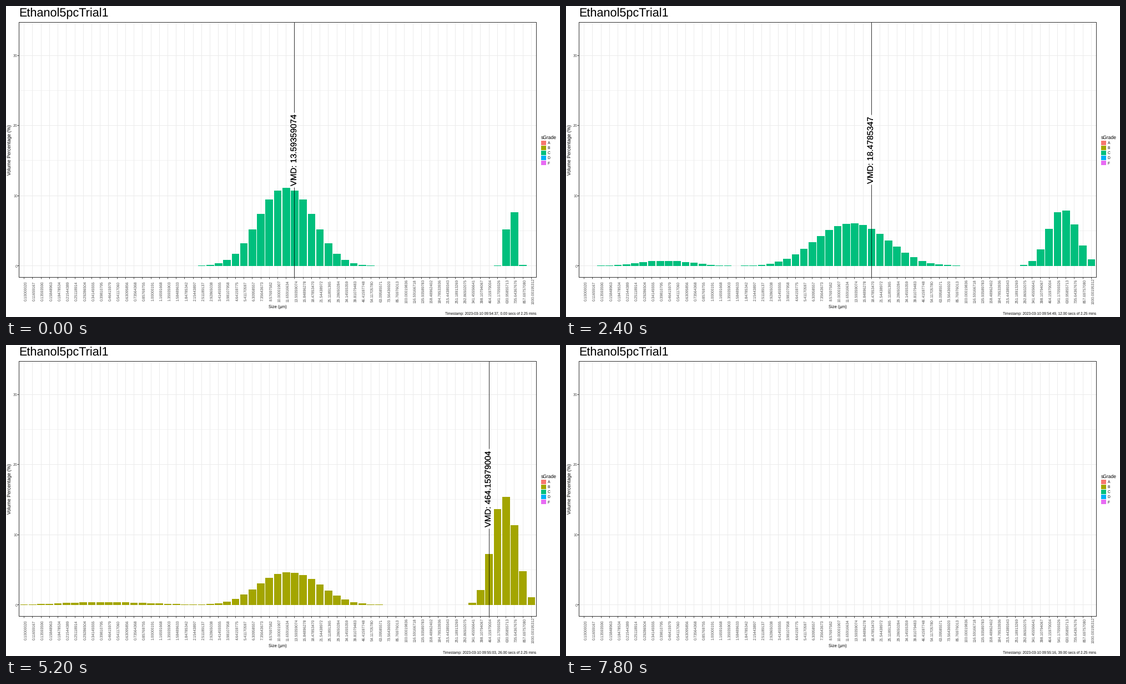
Write a matplotlib script that moves like this. It is 998 by 561 pixels and loops after 8 s.

```python
import numpy as np
import matplotlib.pyplot as plt
from matplotlib.animation import FuncAnimation
from matplotlib.patches import Rectangle

W, H, DPI = 998, 561, 64
FRAMES, INTERVAL = 40, 200
LEFT, RIGHT, TOP, BOTTOM = 23.5, 955.5, 29.5, 489.5
BINS = np.arange(61)
STEP = (RIGHT - LEFT) / (len(BINS) + 0.2)
BASE, UNIT = 468.6, 12.653
LABEL_Y = 259.5
MEDIAN = 0.507

GRADES = {"A": "#F8766D", "B": "#A3A500", "C": "#00BF7D",
          "D": "#00B0F6", "F": "#E76BF3"}

# fifteen bins per decade, stored in single precision
SIZES = [f"{np.float32(1.00000195 * 10 ** (i / 15 - 1)):.8f}" for i in BINS]

# second: grade, then (height, centre bin, width) of fine, main, coarse peaks
KEYS = {
    0: ("C", (0, 10, 2), (11.15, 31, 4.51), (10, 57.6, 0.73)),
    5: ("B", (1.7, 10, 2.03), (7.45, 31, 5.12), (7, 56.62, 2.34)),
    12: ("C", (0.72, 9.6, 4.4), (6.05, 31.65, 5.9), (8, 56.6, 2.38)),
    22: ("C", (0.36, 9.5, 6.7), (5.75, 31.5, 4.95), (9.75, 56.4, 2.82)),
    26: ("B", (0.39, 9.8, 6.8), (4.63, 31.4, 5.05), (15.5, 56.8, 2.04)),
    31: ("C", (0.3, 9.8, 7.5), (3.35, 31.5, 5.45), (13.6, 56.47, 2.76)),
    38: ("C", (0.28, 9.8, 7.6), (2.2, 31.5, 6), (15.2, 56.4, 2.8)),
}
TIMES = list(KEYS)
PEAKS = np.array([key[1:] for key in KEYS.values()], float)


def volumes(sec):
    """Percentage per bin: three bell curves whose parameters drift."""
    if sec > TIMES[-1]:
        return np.zeros(len(BINS))
    total = 0
    for peak in range(3):
        h, centre, width = (np.interp(sec, TIMES, PEAKS[:, peak, j])
                            for j in range(3))
        total = total + h * np.exp(-np.abs((BINS - centre) / width) ** 2.2)
    return np.where(total < 0.025, 0, total)


def grade(sec):
    return KEYS[min(KEYS, key=lambda k: abs(k - sec))][0]


def bin_x(i):
    return LEFT + (i + 0.6) * STEP


def vol_y(v):
    return BASE - v * UNIT


plt.rcParams.update({"font.family": "Liberation Sans", "text.hinting": "none"})
fig = plt.figure(figsize=(W / DPI, H / DPI), dpi=DPI, facecolor="white")
ax = fig.add_axes([0, 0, 1, 1])
ax.set(xlim=(0, W), ylim=(H, 0))
ax.axis("off")


def px(n):
    return n * 72 / DPI


def text(x, y, s, size, color="black", **kw):
    return ax.text(x, y, s, fontsize=px(size), color=color, **kw)


def place(path, xs, ys):
    # strokes snap half a pixel up, so shift them back
    path.set_data(np.array(xs) - 0.5, np.array(ys) - 0.5)


def line(xs, ys, color, width, z=1):
    path, = ax.plot([], [], color=color, lw=px(width), zorder=z,
                    solid_capstyle="butt")
    place(path, xs, ys)
    return path


GRID, DARK, GREY = "#EBEBEB", "#333333", "#4D4D4D"
upright = dict(ha="center", va="center", rotation=90)

for v in range(0, 35, 5):
    major = v % 10 == 0
    line([LEFT, RIGHT], [vol_y(v)] * 2, GRID, 1 if major else 0.6)
    if major:
        line([LEFT - 2.5, LEFT], [vol_y(v)] * 2, DARK, 0.9)
        text(20.8, vol_y(v) + 0.3, str(v), 7, GREY, ha="right",
             va="center_baseline")

for i, size in enumerate(SIZES):
    x = bin_x(i)
    line([x, x], [TOP, BOTTOM], GRID, 1)
    line([x, x], [BOTTOM, BOTTOM + 2.5], DARK, 0.9)
    text(x + 3.2, 514.5, size, 6.7, GREY, **upright)

line([LEFT, RIGHT, RIGHT, LEFT, LEFT], [TOP, TOP, BOTTOM, BOTTOM, TOP],
     DARK, 1, 6)

text(23, 19.3, "Ethanol5pcTrial1", 21.6)
text(489, 545, "Size (µm)", 7.6, ha="center")
text(7, 259, "Volume Percentage (%)", 8.6, **upright)

text(964, 239.8, "sGrade", 8.5)
for i, (name, color) in enumerate(GRADES.items()):
    y = 242.6 + i * 9.05
    ax.add_patch(Rectangle((964.2, y), 8.6, 8.5, fc=color, lw=0))
    text(975.8, y + 6.7, name, 6.6)

bars = ax.bar(bin_x(BINS), 0, 0.9 * STEP, bottom=BASE, lw=0, zorder=2)
upper = line([], [], "black", 0.8, 4)
lower = line([], [], "black", 0.8, 4)
# overprinted so the label reads dense
labels = [text(0, LABEL_Y, "", 15, zorder=5, **upright) for _ in range(2)]
stamp = text(955.5, 556.3, "", 6.5, ha="right")


def show_median(vols):
    visible = vols.any()
    for part in (upper, lower, *labels):
        part.set_visible(visible)
    if not visible:
        return
    i = np.argmax(np.cumsum(vols) >= MEDIAN * vols.sum())
    caption = "VMD: " + SIZES[i].rstrip("0")
    half = 4.5 * (len(caption) - 1)
    x = bin_x(i)
    place(upper, [x, x], [TOP, LABEL_Y - half])
    place(lower, [x, x], [LABEL_Y + half, BOTTOM])
    for label in labels:
        label.set_text(caption)
        label.set_x(x)


def update(sec):
    vols = volumes(sec)
    color = GRADES[grade(sec)]
    for bar, v in zip(bars, vols):
        bar.set_height(-v * UNIT)
        bar.set_facecolor(color)
        bar.set_visible(v > 0)
    show_median(vols)
    minute, second = divmod(54 * 60 + 37 + sec, 60)
    stamp.set_text(f"Timestamp: 2023-03-10 09:{minute:02d}:{second:02d}, "
                   f"{sec:.2f} secs of 2.25 mins")
    return [*bars, upper, lower, *labels, stamp]


anim = FuncAnimation(fig, update, frames=FRAMES, interval=INTERVAL,
                     init_func=lambda: update(0), repeat=True, repeat_delay=0,
                     blit=False)
plt.show()
```
